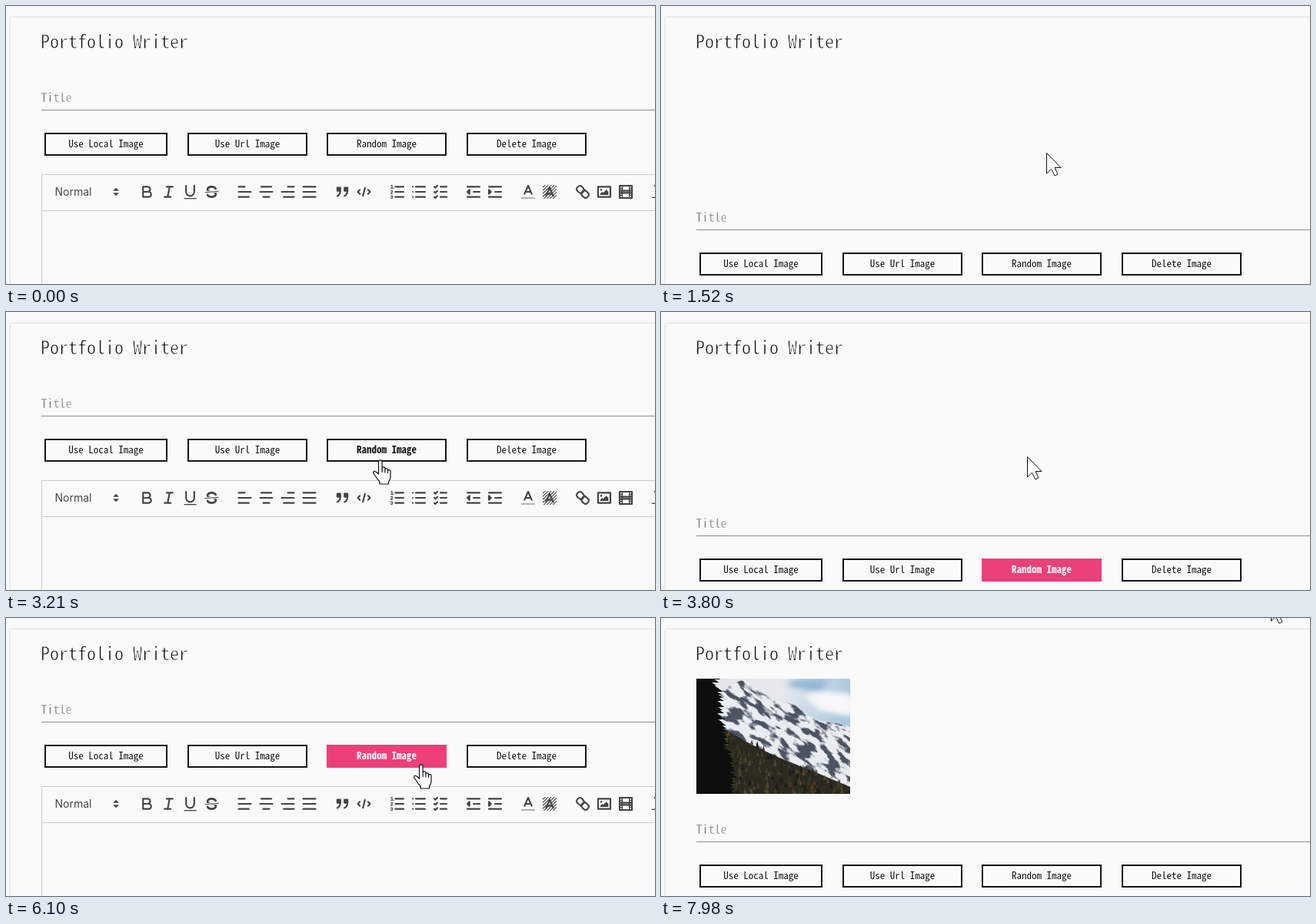
Write an HTML page that moves like this. It is 844 px wide and 362 px high and loops after 8.46 s.

```html
<!DOCTYPE html>
<html lang="en">
<head>
<meta charset="utf-8">
<title>Portfolio Writer</title>
<style>
html, body { margin: 0; width: 100%; height: 100%; overflow: hidden; background: #f9f9f9; }
svg { display: block; width: 100%; height: 100%; overflow: hidden; }
.card { fill: #fafafa; filter: drop-shadow(0 0 1.5px rgba(0,0,0,.22)); }
text { font-family: "Noto Sans Mono CJK JP", "Noto Sans Mono CJK SC", "Noto Sans Mono", monospace; white-space: pre; }
.thin { stroke: #fafafa; }
.ui { font-family: Inter, Roboto, sans-serif; font-size: 14px; fill: #444; }
.icon { fill: none; stroke: #444; stroke-width: 1.6; stroke-linecap: round; stroke-linejoin: round; }
.icon .f { fill: #444; stroke: none; }
.icon .fs { fill: #444; }
.icon .t { stroke-width: .8; }
#ibeam { mix-blend-mode: difference; }
</style>
</head>
<body>
<svg viewBox="0 0 844 362" preserveAspectRatio="xMinYMin meet">
  <defs>
    <clipPath id="frame"><rect id="reveal" width="200" height="150"/></clipPath>
    <clipPath id="massif"><path d="M20 40L34 16 48 6 62 1 74 11 88 19 104 29 118 31 129 35 144 48 164 56 182 58 200 63V150H20z"/></clipPath>
    <filter id="b1"><feGaussianBlur stdDeviation="1"/></filter>
    <filter id="b4" x="-30%" y="-80%" width="160%" height="260%"><feGaussianBlur stdDeviation="5 3"/></filter>
    <filter id="crag" x="0" y="0" width="1" height="1" color-interpolation-filters="sRGB">
      <feTurbulence type="fractalNoise" baseFrequency=".05 .13" numOctaves="5" seed="4"/>
      <feColorMatrix values="0 0 0 0 .3  0 0 0 0 .33  0 0 0 0 .39  7 0 0 0 -3.3"/>
    </filter>
    <linearGradient id="dusk" x1="0" y1="0" x2="0" y2="1">
      <stop offset="0" stop-color="#242321"/><stop offset=".22" stop-color="#30302f"/>
      <stop offset=".38" stop-color="#4a545b"/><stop offset=".56" stop-color="#56606a"/><stop offset=".7" stop-color="#2a2724"/>
    </linearGradient>
    <linearGradient id="ground" x1="0" y1="0" x2="0" y2="1">
      <stop offset="0" stop-color="#1a1a1a"/><stop offset="1" stop-color="#101010"/>
    </linearGradient>
    <linearGradient id="pot" x1="0" y1="0" x2="1" y2="0">
      <stop offset="0" stop-color="#c98b68"/><stop offset=".6" stop-color="#b5714e"/><stop offset="1" stop-color="#6d3f2a"/>
    </linearGradient>
    <linearGradient id="china" x1="0" y1="0" x2="1" y2="0">
      <stop offset="0" stop-color="#bcc1c3"/><stop offset=".5" stop-color="#d9dcdc"/><stop offset="1" stop-color="#7d8488"/>
    </linearGradient>
    <linearGradient id="glaze" x1="0" y1="0" x2="0" y2="1">
      <stop offset="0" stop-color="#70757e"/><stop offset=".5" stop-color="#4a4f59"/><stop offset=".58" stop-color="#11192b"/><stop offset="1" stop-color="#0a1122"/>
    </linearGradient>
    <linearGradient id="sky" x1="0" y1="0" x2="1" y2=".2">
      <stop offset="0" stop-color="#dfe3e6"/><stop offset=".55" stop-color="#e6eaed"/><stop offset="1" stop-color="#a9c6dc"/>
    </linearGradient>
  </defs>

  <rect class="card" x="6" y="15" width="860" height="370"/>
  <text class="thin" x="45" y="55" font-size="24" fill="#111" stroke-width=".75">Portfolio Writer</text>

  <g transform="translate(46 79)"><g clip-path="url(#frame)">
    <g class="photo">
      <path fill="url(#dusk)" d="M0 0h200v150H0z"/>
      <g filter="url(#b4)">
        <path fill="#1d1d1d" d="M0 8Q60 30 130 18T200 26V38Q120 34 70 42T0 30z"/>
        <path fill="#6e7b85" d="M30 50Q90 38 150 46L120 58Q70 62 30 56z"/>
        <path fill="#92a2b0" d="M84 72Q140 50 200 44V58Q150 66 110 76z"/>
        <path fill="#34383c" d="M0 46Q40 58 80 66L60 78 0 70z"/>
        <path fill="#807365" d="M70 82Q130 70 200 70V80L90 92z"/>
        <path fill="#3c4044" d="M120 66Q160 60 200 64V70Q160 72 130 74z"/>
      </g>
      <path filter="url(#b1)" fill="url(#ground)" d="M-4 68Q24 74 56 82Q78 92 92 95H140Q172 84 204 76V155H-4z"/>
      <g fill="#d8232b"><path d="M75 99l3 2 3-2-2 5zM86 99l3 2 3-2-2 5z"/><path d="M106 97h8v2h-8zM116 97h10v3h-10z" opacity=".8"/></g>
      <path stroke="#eee" d="M94 98h6"/><path fill="none" stroke="#8a4a48" d="M126 99q14-3 22-1t18 1"/>
    </g>

    <g class="photo">
      <path fill="#141518" d="M0 0h200v150H0z"/>
      <path fill="#242528" d="M88 8q40 14 112 2v24q-70 14-120 8z" filter="url(#b4)"/>
      <path fill="url(#pot)" d="M0 8H76L73 42Q68 54 60 62H0z"/><path fill="#d39b78" d="M0 8H80L79 18Q40 26 0 20z" opacity=".7"/>
      <path fill="#6b8d3f" d="M0 0H92Q88 12 66 8Q50 14 36 7Q20 11 0 8z"/><path fill="#96b263" d="M6 0h30l-10 6zM50 0h26l-8 6z"/>
      <path fill="#8f8a82" d="M106 68L130 58 200 64V120H160z"/><path fill="#dedad1" d="M108 70L132 58 200 67V76Q150 76 108 74z"/>
      <path fill="#7d6048" d="M168 96q18-6 32-4v26h-34z"/>
      <path fill="url(#china)" d="M0 56Q24 54 36 62Q42 66 46 62Q54 56 66 66Q56 72 52 86V120Q40 140 0 146z"/>
      <path fill="#eceded" d="M0 136H200V150H0z"/>
      <ellipse cx="114" cy="137" rx="97" ry="14" fill="#eff0f0"/><ellipse cx="114" cy="134.500" rx="92" ry="11" fill="#121c35"/><ellipse cx="110" cy="137" rx="58" ry="8" fill="#070b16"/>
      <path fill="none" stroke="#101a33" stroke-width="7" d="M166 94Q196 88 194 104T164 127"/><path fill="none" stroke="#8c98ae" d="M170 92Q200 88 196 106"/>
      <path fill="url(#glaze)" d="M48 82H171Q172 118 150 138Q110 146 76 138Q50 118 48 82z"/>
      <path fill="#23262d" d="M72 98q14-6 26 2t-6 12q-22 6-20-14z"/><path fill="#30343c" d="M110 96q10 2 14 14h-16z"/>
      <ellipse cx="109.500" cy="82" rx="62" ry="7" fill="#f0f0ed" stroke="#18264d" stroke-width="1.500"/><ellipse cx="110" cy="84" rx="52" ry="4" fill="#d2d0c8"/>
      <path fill="none" stroke="#8594a0" stroke-width="3" opacity=".25" filter="url(#b1)" d="M108 58Q98 48 122 42T136 30Q160 44 152 22M130 54Q160 60 146 38"/>
      <path fill="none" stroke="#7b8597" stroke-width="1.500" d="M84 142q16 0 24-8M144 141q-14 0-22-8"/>
    </g>

    <g class="photo">
      <path fill="url(#sky)" d="M0 0h200v150H0z"/>
      <path fill="#82acd0" opacity=".75" filter="url(#b4)" d="M120 4Q150-4 172 4L160 18Q140 14 120 10z"/>
      <path fill="#f6f7f8" filter="url(#b4)" d="M140 22Q170 12 205 22V50L160 42z"/>
      <g clip-path="url(#massif)">
        <path fill="#e9ecf1" d="M0 0h200v150H0z"/>
        <g transform="rotate(38)"><rect x="0" y="-130" width="270" height="260" filter="url(#crag)"/></g>
      </g>
      <path fill="#2d2a20" d="M26 58Q60 82 108 103L160 124 200 141V150H0z"/>
      <g id="forest"></g><g id="firs"></g>
    </g>
  </g></g>

  <g id="body">
    <text class="thin" x="45.500" y="125" font-size="16" fill="#777" stroke-width=".4">Title</text>
    <path stroke="#8e8e8e" d="M46 135.500H844"/>
    <g id="buttons"></g>
    <path fill="none" stroke="#ccc" d="M46.500 362V219.500H860V266.500H46.500"/>
    <text class="ui" x="63.500" y="247">Normal</text>
    <g class="icon" transform="translate(134 233)"><path class="fs" style="stroke-linejoin:miter" d="M7 11L9 13 11 11zM7 7L9 5 11 7z"/></g>
    <g id="icons"></g>
  </g>

  <g id="cursor">
    <path id="arrow" fill="#fff" stroke="#111" d="M.5.5V27L6.500 21.300 11 30 15 28 11 19.500H19z"/>
    <path id="hand" fill="#fff" stroke="#111" stroke-width="1.200" stroke-linejoin="round" d="M-2.500 18V2.200a2.300 2.300 0 0 1 4.600 0V10.500a1.900 1.600 0 0 1 3.800 0V12a1.800 1.500 0 0 1 3.600.5V14a1.700 1.500 0 0 1 3.500.5V21Q13 25 10.500 28V31H-1V28Q-4 25-7 20L-9.500 16.500Q-9 13-6 15zM2.100 10.500V16M5.900 12V16.500M9.500 13.500V17"/>
    <path id="ibeam" fill="none" stroke="#fff" d="M-3-6.500H-1L.5-5.500 2-6.500H4M.5-5.500V5.500M-3 6.500H-1L.5 5.500 2 6.500H4"/>
  </g>
</svg>
<script>
const LOOP = 8460, SHIFT = 156, FILL_MS = 280, CLEAR_MS = 210;
const NS = 'http://www.w3.org/2000/svg';
const $ = id => document.getElementById(id);
const clamp = v => Math.max(0, Math.min(1, v));
function add(parent, tag, attrs, text) {
  const el = parent.appendChild(document.createElementNS(NS, tag));
  for (const k in attrs) el.setAttribute(k, attrs[k]);
  if (text) el.textContent = text;
  return el;
}

// Toolbar icons on an 18-unit grid
const p = (d, c = '') => `<path class="${c}" d="${d}"/>`;
const lines = (...rows) => p(rows.map(([a, b], i) => `M${a} ${4 + i * 5}H${b}`).join(''));
const hatch = Array.from({ length: 8 }, (_, i) => {
  const s = 3 * i + 7;
  return `M${Math.max(2.5, s - 15.5)} ${Math.min(15.5, s - 2.5)}L${Math.min(15.5, s - 2.5)} ${Math.max(2.5, s - 15.5)}`;
}).join('');
const numerals = p('M2.500 5.500H5.500M2.800 3L3.800 2.500V5.500M4.500 10.500h-2c0-.2 1.800-1.100 1.800-2.200A1 1 0 0 0 2.500 8.200M2.500 14.800a1 1 0 0 0 1.800-.1A.7.7 0 0 0 3.700 14a.7.7 0 0 0 .6-.7 1 1 0 0 0-1.800-.1', 't');
const sprockets = [3, 12].map(x => [5, 7, 10, 12].map(y => `M${x} ${y}h3v1h-3z`).join('')).join('');
const icons = [
  [183.500, p('M5 4H9.500A2.500 2.500 0 0 1 9.500 9H5zM5 9H10.500A2.500 2.500 0 0 1 10.500 14H5z')],
  [211.500, p('M7 4H13M5 14H11M8 14L10 4')],
  [239.500, p('M5 3V9a4 4 0 0 0 8 0V3') + p('M3 15H15V16H3z', 'f')],
  [267.500, p('M15.500 8.500L2.500 9.500', 't') + p('M9 8C6.500 7.800 6 7.500 6 6.500 6 5.800 7.300 5 9 5c1.600 0 2.800.7 3 1.300a1 1 0 0 0 1.900-.6C13.400 4.100 11.400 3 9 3 6.200 3 4 4.500 4 6.500a3.200 3.200 0 0 0 .5 1.800zM9 10c2.500.2 3 .5 3 1.500 0 .7-1.300 1.500-3 1.500-1.600 0-2.800-.7-3-1.300a1 1 0 1 0-1.900.6C4.600 13.900 6.600 15 9 15c2.800 0 5-1.500 5-3.500a3.200 3.200 0 0 0-.5-1.800z', 'f')],
  [310.500, lines([3, 9], [3, 15], [3, 13])],
  [338.500, lines([4, 14], [3, 15], [6, 12])],
  [366.500, lines([9, 15], [3, 15], [5, 15])],
  [394.500, lines([3, 15], [3, 15], [3, 15])],
  [437.500, p('M4 5H7V8H4zM11 5H14V8H11zM7 8c0 4-3 5-3 5M14 8c0 4-3 5-3 5', 'fs')],
  [465.500, p('M5 7L3 9 5 11M13 7L15 9 13 11M10 5L8 13')],
  [509, lines([7, 15], [7, 15], [7, 15]) + numerals],
  [537, lines([6, 15], [6, 15], [6, 15]) + lines([3, 3], [3, 3], [3, 3])],
  [565, lines([9, 15], [9, 15], [9, 15]) + p('M3 4L4 5 6 3M3 9L4 10 6 8M3 14L4 15 6 13')],
  [608, p('M3 4H15M9 9H15M3 14H15') + p('M5 7V11L3 9z', 'fs')],
  [636, p('M3 4H15M9 9H15M3 14H15') + p('M3 7V11L5 9z', 'fs')],
  [679, p('M5.500 11L9 3 12.500 11M11.600 9H6.400') + '<path d="M3 15H15" opacity=".4"/>'],
  [707, p(hatch, 't') + p('M5.500 13L9 5 12.500 13M11.600 11H6.400')],
  [750, p('M7 11L11 7M8.900 4.600a3.500 3.500 0 0 1 .4 4.700A3.500 3.500 0 0 1 4.600 8.900C3.200 7.500 2 6.400 4.200 4.200S7.500 3.200 8.900 4.600zM13.400 9.100a3.500 3.500 0 0 0-4.700-.4 3.500 3.500 0 0 0 .4 4.700c1.400 1.400 2.500 2.500 4.700.4S14.800 10.500 13.400 9.100z')],
  [778, p('M3 4H15V14H3z') + p('M5 7a1 1 0 1 1 2 0 1 1 0 0 1-2 0M5 12V11L7 9 8 10 11 7 13 9V12z', 'f')],
  [806, p('M3 3H15V15H3zM5 8H13V10H5z') + p('M5 3H6V15H5zM12 3H13V15H12z' + sprockets, 'f')],
  [849, p('M5 3H13') + p('M2 14H10V15H2z', 'f')]
];
$('icons').innerHTML = icons.map(([x, art]) =>
  `<g class="icon" transform="translate(${x - 12} 230) scale(1.3333)">${art}</g>`).join('');

// Buttons
const buttons = [[50, 160, 'Use Local Image'], [236, 156, 'Use Url Image'], [417, 156, 'Random Image'], [599, 156, 'Delete Image']]
  .map(([x, w, label]) => {
    const g = add($('buttons'), 'g', { transform: `translate(${x} 165)` });
    const fill = add(g, 'path', { d: '' });
    const edge = add(g, 'rect', { x: 1, y: 1, width: w - 2, height: 28, fill: 'none', 'stroke-width': 2 });
    const text = add(g, 'text', { x: w / 2, y: 19, 'font-size': 13, 'text-anchor': 'middle' }, label);
    return { w, fill, edge, text };
  });
const mix = (a, b, k) => `rgb(${a.map((v, i) => Math.round(v + (b[i] - v) * k))})`;
const INK = [20, 20, 20], PINK = [236, 64, 122], WHITE = [255, 255, 255];

function sweep(w, k) {
  const d = k * (15 * w + 41 * 30), top = Math.min(w, d / 15), left = Math.min(30, d / 41);
  const right = clamp((d - 15 * w) / 1230) * 30, base = clamp((d - 1230) / (15 * w)) * w;
  return `M0 0H${top}V${right}L${base} ${left}H0z`;
}
function paint(b, tint, area, bold) {
  b.fill.setAttribute('d', area ? sweep(b.w, area) : '');
  b.fill.setAttribute('fill', mix(INK, PINK, tint));
  b.edge.setAttribute('stroke', mix(INK, PINK, tint));
  b.text.setAttribute('fill', mix(INK, WHITE, tint));
  b.text.setAttribute('font-weight', bold ? 700 : 400);
}

// Trees below the mountain
let seed = 7;
const rnd = () => (seed = seed * 16807 % 2147483647) / 2147483647;
const edgeY = x => 46 + x * .58 - x * x * .0005;
for (let i = 0; i < 420; i++) {
  const x = 20 + rnd() * 180, y = edgeY(x) + (i / 420) ** .8 * 80, h = 5 + rnd() * 6;
  add($('forest'), 'path', { d: `M${x} ${y - h}l2.200 ${h}h-4.400z`,
    fill: ['#23281f', '#57462b', '#34382a', '#191d19', '#463c28'][i % 5] });
}
for (let y = -4; y < 150; y += 4) {
  const x = 25 + y * .17 + rnd() * 8;
  add($('firs'), 'path', { d: `M-2 ${y - 3}L${x - 7} ${y} ${x} ${y + 5} ${x - 9} ${y + 5} -2 ${y + 10}z`, fill: '#0c0f0e' });
}

// Timeline
const open = [[1140, 2720], [3800, 5470], [6170, LOOP]];
const shown = [[1590, 2720], [4190, 5470], [6680, LOOP]];
const hovers = [[2, 670, 1140], [3, 2070, 2720], [2, 3210, 3800], [3, 5120, 5470], [2, 5680, 6170]];
const path = [
  [320, 548, 364], [690, 506, 193], [950, 501, 191], [1520, 501, 191], [2100, 617, 334], [2420, 620, 340], [2720, 620, 340],
  [3230, 486, 192], [3490, 476, 188], [4520, 476, 188], [4940, 577, 275], [5050, 577, 275], [5170, 612, 322],
  [5470, 612, 322], [5690, 540, 191], [7490, 540, 191], [7980, 793, -23]
];
const photos = document.querySelectorAll('.photo');
const within = ([a, b], t) => t >= a && t < b;

function cursorAt(t) {
  const i = path.findIndex(k => k[0] > t);
  if (i < 0) return path[path.length - 1].slice(1);
  if (i === 0) return [548, 420];
  const [t0, x0, y0] = path[i - 1], [t1, x1, y1] = path[i];
  const u = (t - t0) / (t1 - t0), e = u * u * (3 - 2 * u);
  return [x0 + (x1 - x0) * e, y0 + (y1 - y0) * e];
}
function draw(t) {
  const expanded = open.some(o => within(o, t));
  $('body').setAttribute('transform', `translate(0 ${expanded ? SHIFT : 0})`);
  photos.forEach((el, i) => el.style.display = within(shown[i], t) ? '' : 'none');
  $('reveal').setAttribute('height', within([6680, 6860], t) ? 32 : 150);

  const [x, y] = cursorAt(t);
  let kind = !expanded && y > 267 ? 'ibeam' : 'arrow';
  buttons.forEach(b => paint(b, 0, 0, false));
  for (const [n, start, end] of hovers) {
    if (!within([start, end + CLEAR_MS], t)) continue;
    const on = t < end, u = on ? clamp((t - start) / FILL_MS) : 1 - (t - end) / CLEAR_MS;
    paint(buttons[n], on ? 1 - (1 - u) ** 1.9 : u, u ** 2.5, on || u > .5);
    if (on) kind = n === 3 && t >= end - 70 ? 'ibeam' : 'hand';
  }
  $('cursor').setAttribute('transform', `translate(${Math.round(x)} ${Math.round(y)})`);
  for (const id of ['arrow', 'hand', 'ibeam']) $(id).style.display = id === kind ? '' : 'none';
}
const begin = performance.now();
function tick() {
  draw((performance.now() - begin) % LOOP);
  requestAnimationFrame(tick);
}
draw(0);
requestAnimationFrame(tick);
</script>
</body>
</html>
```
